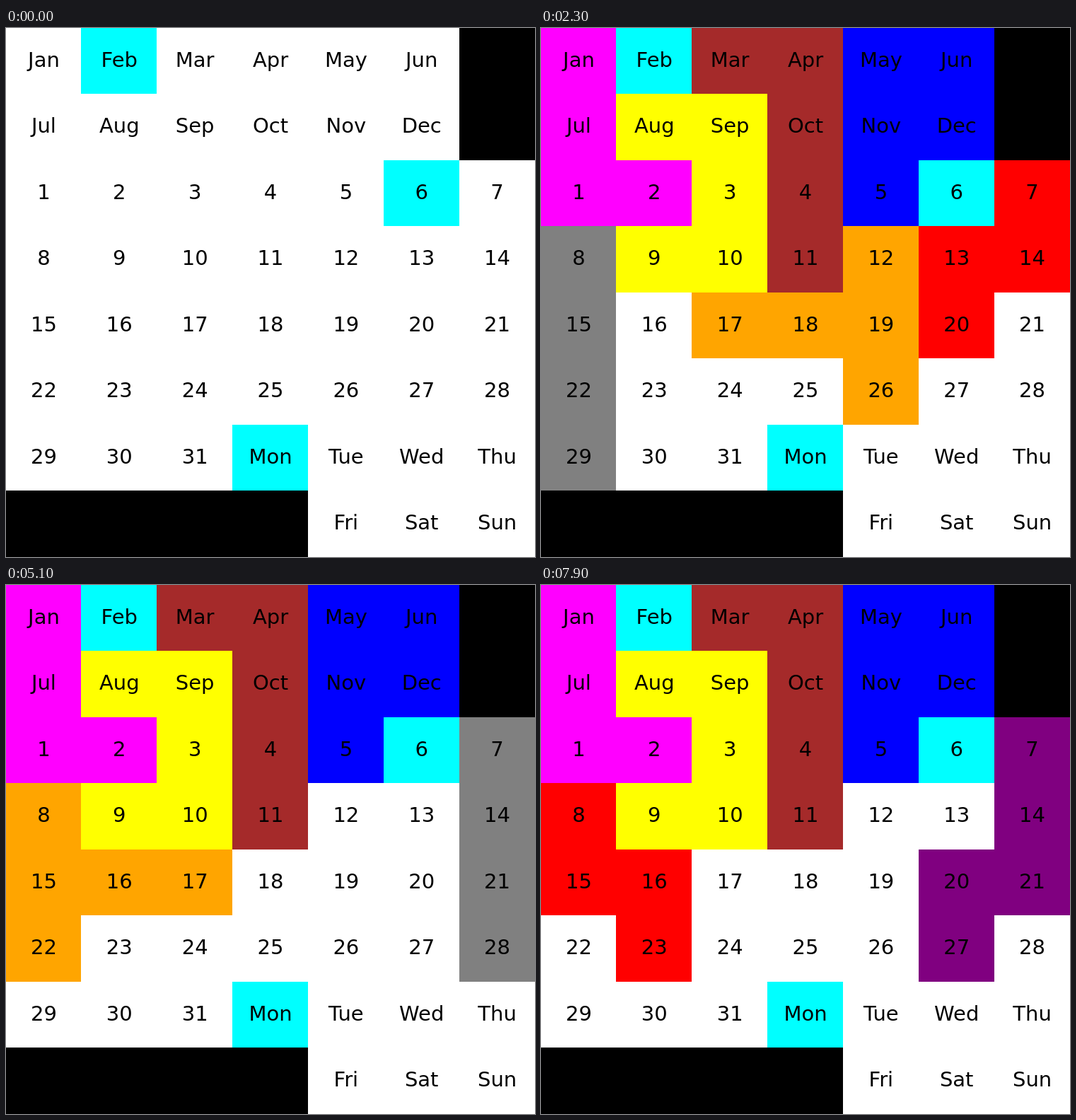
Recreate the animation shown at these times as an HTML page with a canvas. Size 748 by 748 pixels, loop 8 s.

```html
<!DOCTYPE html>
<html lang="en">
<head>
<meta charset="utf-8">
<title>Calendar puzzle solver</title>
<style>
  html, body { margin: 0; width: 100%; height: 100%; overflow: hidden; background: #000; }
  canvas { display: block; }
</style>
</head>
<body>
<canvas id="board" width="748" height="748"></canvas>
<script>
const SIZE = 748, COLS = 7, ROWS = 8;
const LOOP = 8000, FIRST_HOLD = 500, STEP = 200;
const MONTHS = 'Jan Feb Mar Apr May Jun Jul Aug Sep Oct Nov Dec'.split(' ');
const DAYS = Array.from({ length: 31 }, (_, i) => String(i + 1));
const WEEKDAYS = 'Mon Tue Wed Thu Fri Sat Sun'.split(' ');
const DATE = ['Feb', '6', 'Mon'];

// Each move: search depth, colour, first cell, walk over the other cells.
// A move discards every piece at its depth or deeper.
const MOVES = `
0 magenta Jan DDR
1 brown Mar RDDD
2 blue May RDLD
3 yellow Aug RDDL
4 red 7 DLD
5 gray 8 DDD
6 purple 12 DDRD
6 orange 12 DDLRR
7 green 18 LLDD
6 orange 12 DLLRRD
6 pink 12 DLLD
6 green 12 DDLL
6 green 12 DDRR
5 orange 8 DRRLLD
5 pink 8 DRRD
5 green 8 DDRR
4 gray 7 DDD
5 red 8 DRD
6 purple 13 DDLD
6 purple 12 DDRD
6 pink 13 LDDL
6 green 12 DDLL
6 orange 12 DLLRRD
5 orange 8 DRRLLD
6 purple 13 DDLD
6 pink 13 LDDL
5 green 8 DDRR
5 purple 8 DDRD
4 pink 7 DLLD
5 gray 8 DDD
6 orange 16 RRLDD
7 purple 20 DDLD
6 green 18 LLDD
7 purple 20 DDLD
6 red 16 DRD
7 purple 20 DDLD
4 purple 7 DDLD
5 red 8 DRD`.trim().split('\n').map(line => line.split(' '));

const WALK = { U: [0, -1], D: [0, 1], L: [-1, 0], R: [1, 0] };
const ctx = document.getElementById('board').getContext('2d');

const cells = new Map();
MONTHS.forEach((label, i) => cells.set(label, [i % 6, Math.floor(i / 6)]));
[...DAYS, ...WEEKDAYS].forEach((label, i) => {
  const slot = i < 35 ? i : i + 4; // the last row is right-aligned
  cells.set(label, [slot % COLS, 2 + Math.floor(slot / COLS)]);
});

const edgeX = col => Math.floor(col * SIZE / COLS);
const edgeY = row => Math.floor(row * SIZE / ROWS);

function fillCell([col, row], color) {
  ctx.fillStyle = color;
  ctx.fillRect(edgeX(col), edgeY(row), edgeX(col + 1) - edgeX(col), edgeY(row + 1) - edgeY(row));
}

function fillPiece([, color, start, path]) {
  let [col, row] = cells.get(start);
  fillCell([col, row], color);
  for (const turn of path) {
    col += WALK[turn][0];
    row += WALK[turn][1];
    fillCell([col, row], color);
  }
}

function drawLabel([col, row], label) {
  ctx.fillText(label, (col + 0.5) * SIZE / COLS, Math.round((row + 0.5) * SIZE / ROWS + 8));
}

function draw(step) {
  const placed = [];
  for (const move of MOVES.slice(0, step)) {
    placed.length = Number(move[0]);
    placed.push(move);
  }
  ctx.fillStyle = '#000';
  ctx.fillRect(0, 0, SIZE, SIZE);
  cells.forEach((cell, label) => fillCell(cell, DATE.includes(label) ? 'cyan' : '#fff'));
  placed.forEach(fillPiece);
  ctx.fillStyle = '#000';
  ctx.font = '29px "DejaVu Sans", sans-serif';
  ctx.textAlign = 'center';
  cells.forEach(drawLabel);
}

const startTime = performance.now();
let shown = -1;

function tick() {
  const time = (performance.now() - startTime) % LOOP;
  const step = time < FIRST_HOLD ? 0 : 1 + Math.floor((time - FIRST_HOLD) / STEP);
  if (step !== shown) draw(shown = step);
  requestAnimationFrame(tick);
}
tick();
</script>
</body>
</html>
```
